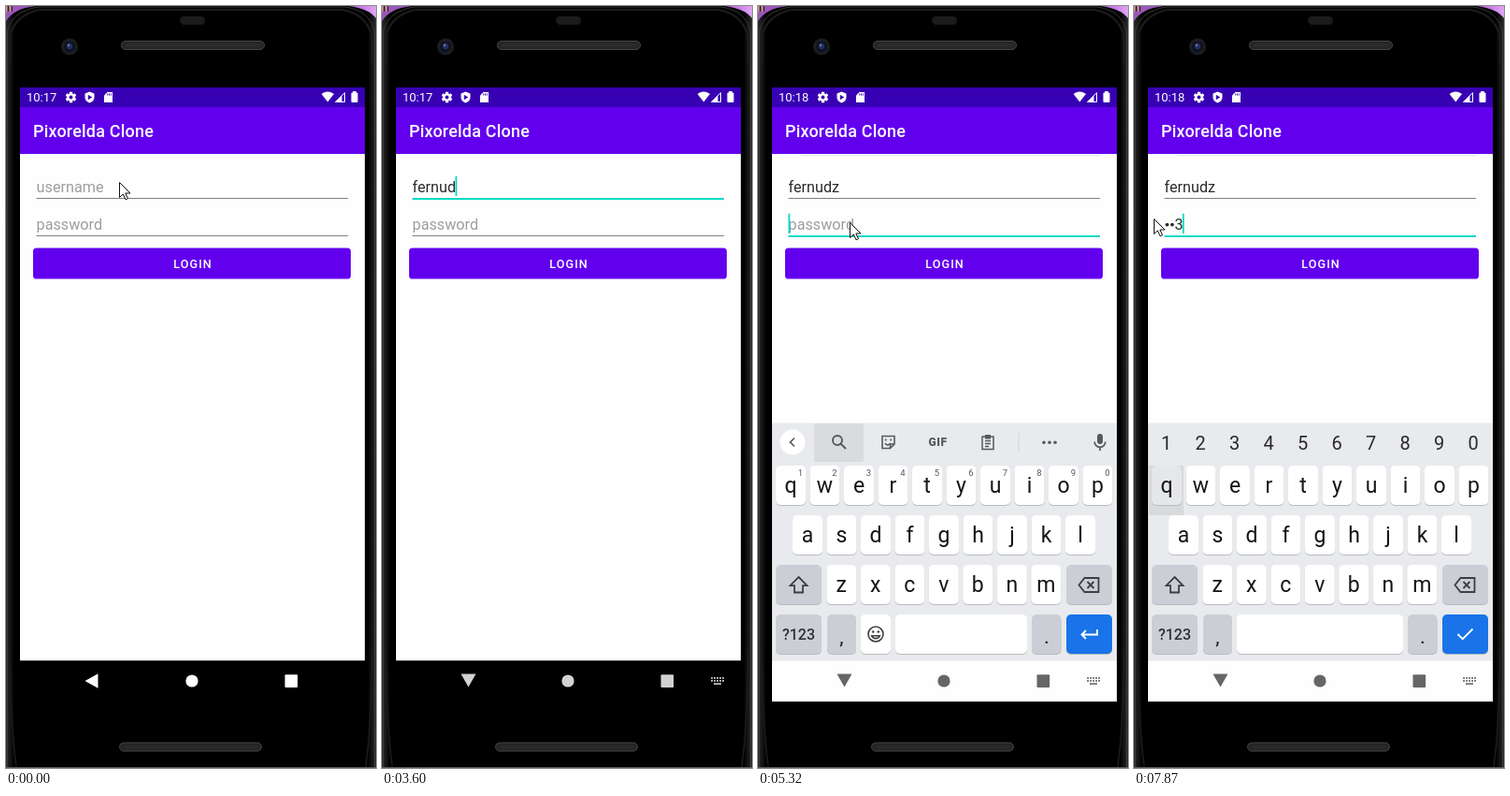
These frames come from a looping animation (396x814 px, 8 s). An HTML page with a canvas:

```html
<!DOCTYPE html>
<html lang="en">
<head>
<meta charset="utf-8">
<title>Login demo</title>
<style>
html, body { margin: 0; width: 100%; height: 100%; overflow: hidden; background: #000; }
canvas { display: block; width: 396px; height: 814px; }
</style>
</head>
<body>
<canvas id="stage"></canvas>
<script>
const W = 396, H = 814, LOOP = 8000;
const canvas = document.getElementById('stage');
const ratio = window.devicePixelRatio || 1;
canvas.width = W * ratio;
canvas.height = H * ratio;
const c = canvas.getContext('2d');
c.scale(ratio, ratio);

const PURPLE = '#6200ee', TEAL = '#03dac5', ICON = '#55585d', GREY_KEY = '#cbced5';
const USER = 'fernudz';

// Value of the last [time, value] pair that has begun.
function at(track, t) {
  let v = track[0][1];
  for (const [start, value] of track) if (t >= start) v = value;
  return v;
}

const cursorTrack = [
  [0, [121, 188]], [140, [115, 188]], [3160, null], [3760, [100, 233]],
  [5180, [98, 231]], [5850, null], [6520, [305, 356]],
  [6800, [301, 345]], [6930, [285, 312]], [7070, [267, 287]],
  [7210, [255, 277]], [7340, [253, 275]], [7870, [21, 227]]
];
const typedTrack = [[0, 0], [3010, 1], [3160, 2], [3300, 3], [3450, 5], [3600, 6], [4590, 7]];
const secretTrack = [[0, ''], [5850, '1'], [6120, '•2'], [6390, '••3']];
const caretTrack = [[0, 0], [1330, 1], [2410, 0], [2710, 1], [5040, 0], [5180, 2]];
const focusTrack = [[0, 0], [1050, 1], [5040, 2]];
const navTrack = [[0, 255], [3450, 235], [3600, 210], [3760, 185], [3890, 155], [4030, 125], [4300, 102]];

function rect(x, y, w, h, fill) {
  c.fillStyle = fill;
  c.fillRect(x, y, w, h);
}
function round(x, y, w, h, r, fill, line) {
  c.beginPath();
  c.roundRect(x, y, w, h, r);
  if (fill) { c.fillStyle = fill; c.fill(); }
  if (line) { c.strokeStyle = line; c.stroke(); }
}
function dot(x, y, r, fill) {
  c.beginPath();
  c.arc(x, y, r, 0, 7);
  c.fillStyle = fill;
  c.fill();
}
function shape(d, x, y, fill, line, width = 1) {
  const p = new Path2D(d);
  c.save();
  c.translate(x, y);
  c.lineWidth = width;
  if (fill) { c.fillStyle = fill; c.fill(p); }
  if (line) { c.strokeStyle = line; c.stroke(p); }
  c.restore();
}
function text(s, x, y, size, color, { weight = 400, align = 'left', gap = 0 } = {}) {
  c.font = `${weight} ${size}px Roboto, sans-serif`;
  c.letterSpacing = gap + 'px';
  c.textAlign = align;
  c.fillStyle = color;
  c.fillText(s, x, y);
  return c.measureText(s).width;
}

function speaker(x, y, w) {
  c.lineWidth = 1;
  round(x + .5, y + .5, w - 1, 9, 4.5, '#252525', '#454545');
  rect(x + 5, y + 3, w - 10, 4, '#2b2b2b');
}

function drawPhone() {
  const sky = c.createLinearGradient(0, 0, W, 0);
  sky.addColorStop(0, '#9a58b8');
  sky.addColorStop(.93, '#b35bd8');
  sky.addColorStop(1, '#dfa6f4');
  rect(0, 0, W, 40, sky);
  for (let i = 0; i < 4; i++) rect(i * 2, 0, 1, 6, i % 2 ? '#2b2118' : '#cda64c');
  rect(0, 40, W, H - 40, '#161616');
  const metal = c.createLinearGradient(0, 0, W, 0);
  metal.addColorStop(0, '#2c2c2c');
  metal.addColorStop(.012, '#141414');
  metal.addColorStop(.022, '#000');
  metal.addColorStop(.978, '#000');
  metal.addColorStop(.988, '#141414');
  metal.addColorStop(1, '#2c2c2c');
  shape('M0 814V16C6 7 15 2 32 0H366C382 2 390 6 396 13V814Z', 0, 0, metal);
  shape('M1.5 813V27C5 12 15 5 34 1H363C381 4 390 11 394.5 27V813', 0, 0, null, '#383838', 1);
  shape('M4.5 60V32C8 16 18 9 35 4H361C378 8 387 16 391.5 32V60', 0, 0, null, '#1c1c1c', 2);
  shape('M4 690C5 750 7 784 11 813M391.5 690C391 750 389 784 385 813', 0, 0, null, '#1c1c1c', 1.5);
  rect(0, 57, 2, 10, '#343434');
  rect(0, 222, 2, 10, '#343434');
  rect(0, 813, W, 1, '#5c5c5c');

  round(186, 11, 27, 9, 4.5, '#1b1b1b');
  dot(68, 43.5, 9, '#1d1d1f');
  dot(68, 43.5, 6, '#0f1222');
  dot(68, 43, 3.2, '#232f5c');
  dot(67, 42, 1.2, '#6878a8');
  speaker(123, 37, 154);
  speaker(121, 786.5, 153);
}

function drawStatus(t) {
  rect(15, 87, 369, 21, '#3700b3');
  text(t < 4300 ? '10:17' : '10:18', 22, 102.3, 13, '#fff');
  // gear
  for (let i = 0; i < 6; i++) {
    c.save();
    c.translate(69.5, 97.5);
    c.rotate(i * Math.PI / 3);
    rect(-1.6, -5.8, 3.2, 4, '#fff');
    c.restore();
  }
  dot(69.5, 97.5, 4.2, '#fff');
  dot(69.5, 97.5, 1.9, '#3700b3');
  // shield
  shape('M0 -6L5 -4V0C5 3 3 5 0 6C-3 5 -5 3 -5 0V-4Z', 89.5, 97.5, '#fff');
  shape('M-1.7 -2.8L2.8 0L-1.7 2.8Z', 89.5, 97.5, '#3700b3');
  // memory card
  shape('M3.5 0H9V11H0V3.5Z', 105, 92, '#fff');
  for (let i = 0; i < 3; i++) rect(108.3 + i * 1.8, 93.4, .9, 2.2, '#3700b3');
  // wifi, signal, battery
  shape('M0 2.6C4 -.9 9.4 -.9 13.4 2.6L6.7 11Z', 337.6, 91.5, '#fff');
  shape('M.5 10.5H10.5V.7Z', 352, 92, null, '#fff', 1);
  shape('M.5 10.5H7.5V3.7Z', 352, 92, '#fff');
  round(369.5, 92.5, 7, 10.5, 1, '#fff');
  rect(371.3, 91, 3.4, 2, '#fff');
}

function drawField(y, focused) {
  if (focused) rect(32.5, y + 6, 333.5, 2, TEAL);
  else rect(32.5, y + 6, 333.5, 1, '#808080');
}
const caret = (x, y) => rect(x, y - 17.2, 1.8, 21.2, TEAL);

function drawButton(t) {
  const pressed = t >= 7340 && t < 7870;
  if (pressed && t < 7740) round(29, 261, 340, 34.5, 4, '#eeeeee');
  round(29, 258.5, 340, 33, 3.6, PURPLE);
  if (pressed) {
    const reach = at([[0, 110], [7480, 230], [7620, 335], [7740, 340]], t);
    round(369 - reach, 258.5, reach, 33, 3.6, '#8a3ff2');
  }
  text('LOGIN', 200, 280, 12.57, '#fff', { weight: 500, align: 'center', gap: 1.12 });
}

function drawApp(t) {
  rect(15, 157.5, 369, 542, '#fefefe');
  rect(15, 108, 369, 50, PURPLE);
  text('Pixorelda Clone', 29, 140, 17.96, '#fff', { weight: 500, gap: .22 });
  if (t >= 4300) rect(46, 159, 320, 1.5, '#eeeef0');

  const focus = at(focusTrack, t), shown = at(caretTrack, t);
  const name = USER.slice(0, at(typedTrack, t));
  drawField(199, focus === 1);
  const nameWidth = text(name || 'username', 32.6, 199, 16.2, name ? '#2b2b2b' : '#9e9e9e');
  if (shown === 1) caret(name ? 32.6 + nameWidth - .6 : 32.5, 199);

  const secret = at(secretTrack, t);
  drawField(239, focus === 2);
  let x = 32.6;
  if (secret) {
    for (const ch of secret) {
      if (ch === '•') { dot(x + 2.8, 233.6, 1.9, '#2b2b2b'); x += 5.5; }
      else x += text(ch, x, 239, 16.2, '#2b2b2b');
    }
  } else text('password', x, 239, 16.2, '#9e9e9e');
  if (shown === 2) caret(secret ? x - .8 : 32.5, 239);
  drawButton(t);
}

function key(x, y, w, fill = '#fff') {
  round(x, y + 1, w, 42, 5, '#b9bbc0');
  round(x, y, w, 42, 5, fill);
}
function letters(row, cx, y, numeric) {
  [...row].forEach((ch, i) => {
    const x = cx + i * 36.5;
    key(x - 16, y, 32, ch === 'q' && numeric ? '#e6e7ea' : '#fff');
    text(ch, x, y + 28.6, 23, '#151515', { align: 'center' });
  });
}

function drawTools() {
  rect(60, 446, 53, 41, '#d9dbdf');
  dot(37, 466, 13.5, '#fff');
  shape('M2 -4.5L-2.5 0L2 4.5', 37, 466, null, ICON, 1.7);
  shape('M5 -1A5 5 0 1 1 -5 -1A5 5 0 1 1 5 -1M3.5 2.5L9 8', 85, 465, null, ICON, 1.9);
  // sticker
  shape('M-6.5 -6.5H6.5V2L2 6.5H-6.5ZM6.5 2H2V6.5M-3.5 1C-2 4 1 3 2 1', 139.5, 466, null, ICON, 1.6);
  dot(136.8, 463.5, 1.1, ICON);
  dot(142.2, 463.5, 1.1, ICON);
  text('GIF', 192.5, 470.3, 12, ICON, { weight: 900, align: 'center', gap: .6 });
  // clipboard
  shape('M-6 -6H6V7.5H-6ZM-3 -1.5H3M-3 1.5H3M-3 4.5H1', 246, 466, null, ICON, 1.5);
  round(242.8, 458, 6.4, 4.4, 1, ICON);
  rect(278.5, 456, 1, 20, '#d2d4d8');
  for (let i = 0; i < 3; i++) dot(306 + i * 6, 466.3, 1.8, ICON);
  // microphone
  round(363, 457, 6, 11, 3, ICON);
  shape('M-5.8 -.5A5.8 5.8 0 0 0 5.8 -.5M0 5.5V9', 366, 466, null, ICON, 1.7);
}

function drawKeyboard(numeric) {
  rect(15, 445.5, 369, 255, '#e8eaed');
  const digits = '1234567890';
  if (numeric) {
    rect(16, 491, 37, 53, '#d8d9dc');
    [...digits].forEach((d, i) => text(d, 34.5 + i * 36.5, 474, 20, '#2a2a2a', { align: 'center' }));
  } else drawTools();

  letters('qwertyuiop', 35, 491, numeric);
  if (!numeric) [...digits].forEach((d, i) => text(d, 45.5 + i * 36.5, 502, 9.5, '#55585d', { align: 'center' }));
  letters('asdfghjkl', 53, 544);
  letters('zxcvbnm', 89.3, 597);

  key(19, 597, 49, GREY_KEY);
  shape('M0 -8.5L9 .7H4.5V8H-4.5V.7H-9Z', 43.5, 618.5, null, '#3c4043', 1.8);
  key(330, 597, 49, GREY_KEY);
  shape('M-10.5 0L-4.5 -7.5H10.5V7.5H-4.5ZM-1.5 -3.5L5.5 3.5M5.5 -3.5L-1.5 3.5', 354, 618.5, null, '#3c4043', 1.8);

  key(19, 650, 49, GREY_KEY);
  text('?123', 43.5, 677, 16, '#2f3235', { align: 'center', weight: 500 });
  key(74, 650, 31, GREY_KEY);
  text(',', 89.5, 681, 22, '#222', { align: 'center' });
  if (numeric) key(110, 650, 178);
  else {
    key(110, 650, 32);
    shape('M8 0A8 8 0 1 1 -8 0A8 8 0 1 1 8 0M-4.4 1.8C-2.8 5.6 2.8 5.6 4.4 1.8Z', 126, 671, null, '#3c4043', 1.6);
    dot(123.2, 668.5, 1.3, '#3c4043');
    dot(128.8, 668.5, 1.3, '#3c4043');
    key(147, 650, 141);
  }
  key(293, 650, 31.5, GREY_KEY);
  text('.', 308.8, 681, 22, '#222', { align: 'center' });
  key(330, 650, 49, '#1a73e8');
  const mark = numeric ? 'M-8 0L-2.8 5.2L8 -5.5' : 'M8.5 -5V.5H-8M-3.5 -4L-8 .5L-3.5 5';
  shape(mark, 354.5, 671, null, '#fff', 1.8);
}

function drawNav(t, open) {
  const level = open ? 102 : at(navTrack, t), ink = `rgb(${level},${level},${level})`;
  rect(15, 699.5, 369, 43.5, open ? '#fefefe' : '#000');
  if (t < 1520) shape('M84.5 721L98.5 713.3V728.7Z', 0, 0, ink);
  else shape('M84.5 713.5H100.5L92.5 727.5Z', 0, 0, ink);
  dot(199, 721, 6.6, ink);
  round(298.5, 714.3, 13.6, 13.6, 1, ink);
  if (t < 1710) return;
  for (let i = 0; i < 10; i++) rect(352.2 + i % 5 * 3, 717 + Math.floor(i / 5) * 3, 1.8, 1.8, ink);
  rect(355, 723.3, 8, 1.6, ink);
}

function drawCursor(t) {
  const p = at(cursorTrack, t);
  if (p) shape('M0 0V16L3.8 12.5L6.5 18.3L9 17.2L6.3 11.5H11.5Z', p[0] + .5, p[1] + .5, '#fff', '#111', 1);
}

function render(t) {
  const open = t >= 4590;
  drawPhone();
  drawStatus(t);
  drawApp(t);
  if (open) drawKeyboard(t >= 5720);
  drawNav(t, open);
  drawCursor(t);
}

const began = performance.now();
function tick() {
  render((performance.now() - began) % LOOP);
  requestAnimationFrame(tick);
}
tick();
</script>
</body>
</html>
```
